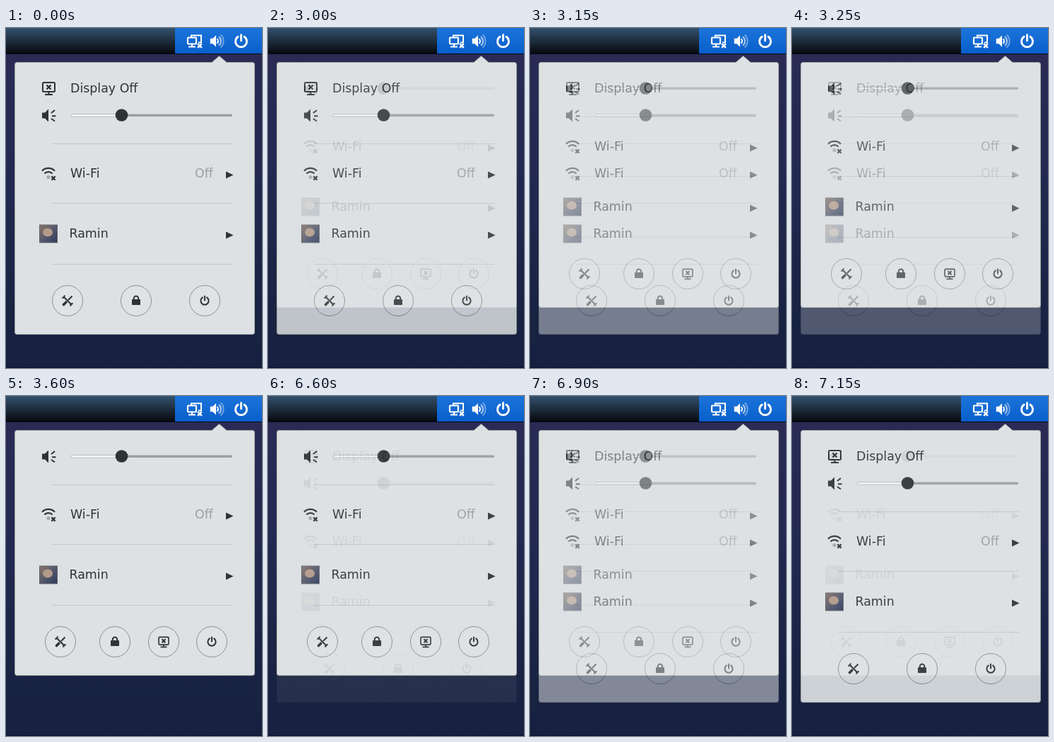
An HTML page for the animation above (7200 ms loop, 362x480 px).

```html
<!DOCTYPE html>
<html lang="en">
<head>
<meta charset="utf-8">
<title>System menu</title>
<style>
  html, body { margin: 0; width: 100%; height: 100%; overflow: hidden; background: #172140; }
  svg { display: block; width: 362px; height: 480px; }
  text { font: 17.4px "DejaVu Sans", sans-serif; fill: #2e3436; white-space: pre; }
  .off { fill: #9da0a2; }
  .line { fill: none; stroke: currentColor; }
</style>
</head>
<body>
<svg viewBox="0 0 362 480" color="#2e3436">
  <defs>
    <linearGradient id="night" gradientUnits="userSpaceOnUse" x1="0" y1="37" x2="0" y2="480">
      <stop offset="0" stop-color="#292b55"/>
      <stop offset=".5" stop-color="#20284e"/>
      <stop offset=".85" stop-color="#182241"/>
      <stop offset="1" stop-color="#172040"/>
    </linearGradient>
    <linearGradient id="bar" x2="0" y2="1">
      <stop offset="0" stop-color="#35516d"/>
      <stop offset="1" stop-color="#060a10"/>
    </linearGradient>
    <linearGradient id="active" x2="0" y2="1">
      <stop offset="0" stop-color="#1c74da"/>
      <stop offset="1" stop-color="#0a5fcb"/>
    </linearGradient>
    <linearGradient id="photo" x2="1" y2="1">
      <stop offset="0" stop-color="#8d7468"/>
      <stop offset=".5" stop-color="#55596c"/>
      <stop offset="1" stop-color="#2c3a5c"/>
    </linearGradient>

    <!-- Icons are centred on 0,0 -->
    <g id="power" class="line" stroke-width="2" stroke-linecap="round">
      <path d="M-3.1-4.6A5.6 5.6 0 1 0 3.1-4.6M0-6.4V-.5"/>
    </g>
    <g id="display" class="line">
      <rect x="-8.5" y="-8" width="17" height="13" rx="1.5" stroke-width="2"/>
      <path d="M-3-4.5 3 1.5M3-4.5-3 1.5" stroke-width="2.4"/>
      <path d="M-5.5 9H5.5M0 5V9" stroke-width="2"/>
    </g>
    <path id="speaker" d="M-9.5-4H-5.5L-.5-9V9L-5.5 4H-9.5Z" fill="currentColor"/>
    <g id="volume">
      <use href="#speaker"/>
      <path class="line" stroke-width="2" d="M4.5.7H10M3.5-3.5 8.5-7.5M3.5 4.5 8.5 8"/>
    </g>
    <path id="cross" class="line" stroke-width="2.2" d="M-2.6-2.6 2.6 2.6M2.6-2.6-2.6 2.6"/>
    <g id="wifi">
      <g class="line" stroke="#a6aaac" stroke-width="2.2">
        <path d="M-9-3.8A12.7 12.7 0 0 1 9-3.8M-5.6 0A8 8 0 0 1 5.6 0"/>
      </g>
      <circle cy="5" r="2.6" fill="#a6aaac"/>
      <use href="#cross" x="7" y="6.5"/>
    </g>
    <g id="lock">
      <rect x="-6" y="-2" width="12" height="8" rx=".8" fill="currentColor"/>
      <path class="line" stroke-width="2" d="M-3.2-1.5V-3.3A3.2 3.2 0 0 1 3.2-3.3V-1.5"/>
    </g>
    <g id="tools" class="line">
      <path stroke-width="2" d="M-4.5-4.5 5 5M6.5-6.5 1-1"/>
      <path stroke-width="3.6" stroke-linecap="round" d="M-5.5 5.5-2.2 2.2"/>
      <path stroke-width="2.2" d="M-7.6-4.2A3.2 3.2 0 0 0-4.2-7.6M7.6 4.2A3.2 3.2 0 0 0 4.2 7.6"/>
    </g>
    <g id="avatar">
      <rect x="-12.5" y="-12.5" width="25" height="25" fill="url(#photo)" stroke="#62666a"/>
      <ellipse cx="-1" cy="-2" rx="7" ry="6" fill="#b39a88"/>
    </g>
  </defs>

  <rect width="362" height="480" fill="url(#night)"/>
  <rect y="479" width="362" height="1" fill="#0c1125"/>
  <g id="full"></g>
  <g id="compact" opacity="0"></g>

  <rect width="362" height="36" fill="url(#bar)"/>
  <rect x="239" width="123" height="36" fill="url(#active)"/>
  <rect y="36" width="362" height="1" fill="#060914"/>
  <g color="#fff">
    <path class="line" stroke-width="2" d="M262 13V10.5H276V20.5H272"/>
    <rect class="line" x="257" y="13.5" width="12" height="9" rx="1" stroke-width="2.2"/>
    <path class="line" stroke-width="2.2" d="M263 23V26M258 26.5H268"/>
    <use href="#cross" transform="translate(274 25) scale(1.1)"/>
    <use href="#speaker" transform="translate(297.5 18.5) scale(.92)"/>
    <g class="line" stroke-width="2">
      <path d="M298.5 15.3A4.2 4.2 0 0 1 298.5 21.7"/>
      <path opacity=".65" d="M301 12.3A8 8 0 0 1 301 24.7"/>
      <path opacity=".4" d="M303.5 9.5A12 12 0 0 1 303.5 27.5"/>
    </g>
    <use href="#power" transform="translate(332.5 18.8) scale(1.42)"/>
  </g>
</svg>
<script>
const icon = (name, x, y, scale = 1) =>
  `<use href="#${name}" transform="translate(${x} ${y}) scale(${scale})"/>`;
const label = (text, x, y, type = '') => `<text x="${x}" y="${y}" class="${type}">${text}</text>`;
const rule = y => `<rect x="65" y="${y}" width="256" height="1" fill="#c4c8ca"/>`;
const arrow = y => `<path d="M311 ${y - 5}V${y + 5}L321.5 ${y}Z" fill="currentColor"/>`;

const panel = bottom => `
  <rect x="12" y="37" width="340" height="397" fill="url(#night)"/>
  <path d="M15.5 48.5H291L301.5 39.5 312 48.5H348.5Q351.5 48.5 351.5 51.5V${bottom - 3}
    Q351.5 ${bottom} 348.5 ${bottom}H15.5Q12.5 ${bottom} 12.5 ${bottom - 3}V51.5Q12.5 48.5 15.5 48.5Z"
    fill="#dde1e3" stroke="#969b9a"/>`;

const slider = y => `
  <rect x="92" y="${y - 1.5}" width="228" height="3.5" rx="1.7" fill="#9ca0a2"/>
  <rect x="92" y="${y - 1.5}" width="72" height="3.5" rx="1.7" fill="#f4f6f4" stroke="#b2b6b6" stroke-width=".8"/>
  <circle cx="163.5" cy="${y}" r="8.8" fill="currentColor"/>`;

const rows = y => icon('volume', 60.5, y + .5) + slider(y) + rule(y + 40)
  + icon('wifi', 60, y + 82.5) + label('Wi-Fi', 91, y + 88) + label('Off', 267, y + 88, 'off')
  + arrow(y + 84.5) + rule(y + 124)
  + icon('avatar', 60, y + 167.5) + label('Ramin', 89.5, y + 173)
  + arrow(y + 169.5) + rule(y + 210);

const button = (name, x, y, scale = 1) =>
  `<circle cx="${x}" cy="${y}" r="21.5" fill="#dfe3e5" stroke="#8d9193"/>` + icon(name, x, y, scale);

const full = document.getElementById('full');
const compact = document.getElementById('compact');

full.innerHTML = panel(432.5) + icon('display', 60.5, 85) + label('Display Off', 91, 91) + rows(123)
  + button('tools', 87, 385) + button('lock', 184, 385) + button('power', 281, 385);

compact.innerHTML = panel(394.5) + rows(85)
  + button('tools', 77, 347) + button('lock', 154, 347)
  + button('display', 223, 347, .82) + button('power', 291, 347);

// Cross-fade in 50 ms steps: quick start going in, even coming back.
const LOOP = 7200, STEP = 50, COUNT = 13;
const frames = [{ offset: 0, opacity: 0 }];
const fade = (start, count, value) => {
  for (let k = 1; k <= count; k++) {
    frames.push({ offset: (start + (k - 1) * STEP) / LOOP, opacity: value(k / COUNT) });
  }
};
fade(3000, COUNT, p => 1 - (1 - p) ** 2);
fade(6600, COUNT - 1, p => 1 - p);
frames.push({ offset: 1, opacity: 0 });
frames.forEach(frame => frame.easing = 'step-end');
compact.animate(frames, { duration: LOOP, iterations: Infinity });
</script>
</body>
</html>
```
